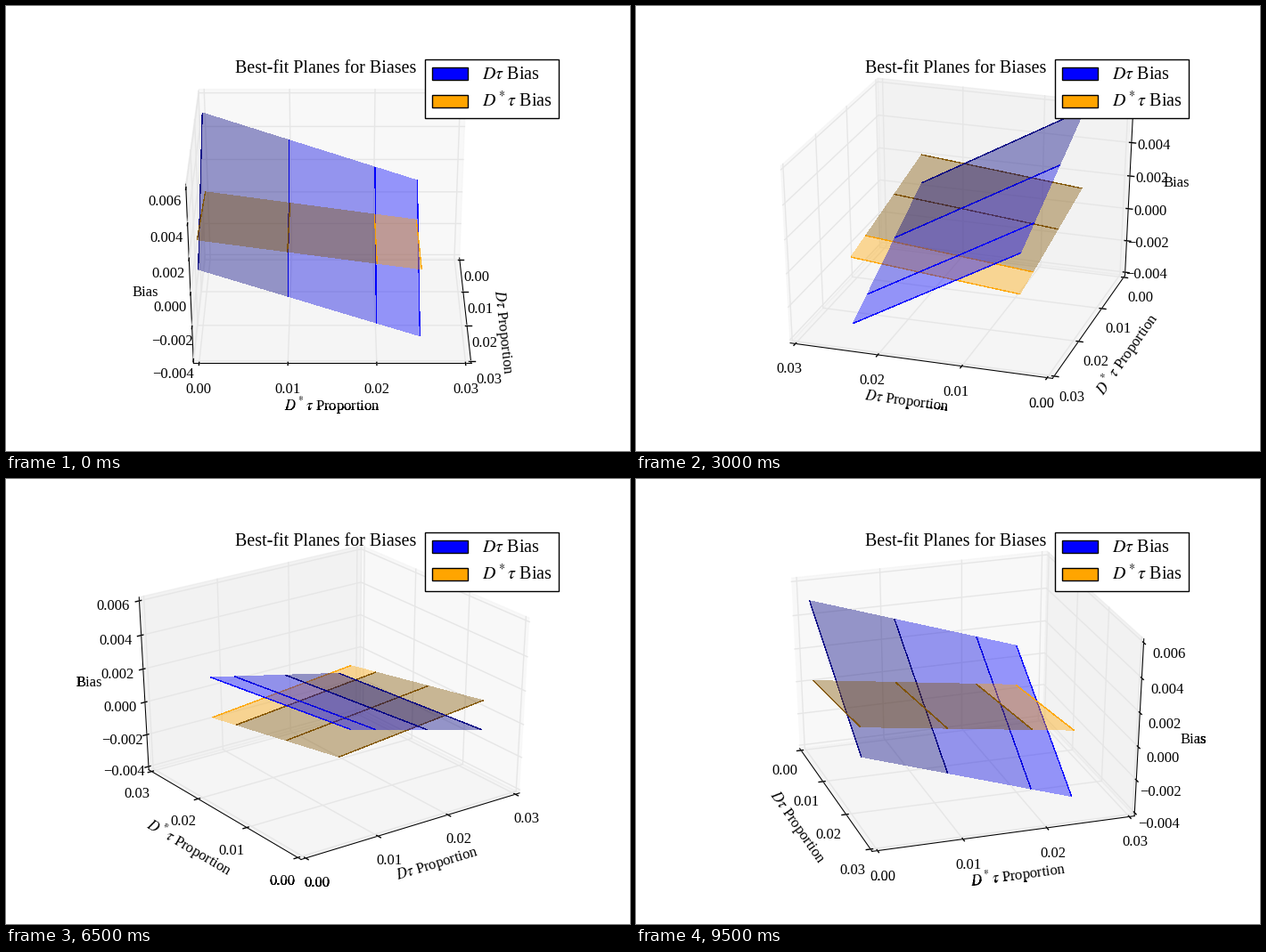
Write a matplotlib script that moves like this. It is 700 px wide and 500 px high and loops after 10000 ms.

```python
import itertools
import math

import matplotlib.pyplot as plt
import numpy as np
from matplotlib.animation import FuncAnimation
from matplotlib.colors import to_rgb
from matplotlib.patches import Polygon, Rectangle
from matplotlib.transforms import Bbox

plt.rcParams["font.family"] = "Liberation Serif"
plt.rcParams["mathtext.fontset"] = "stix"

W, H, FRAMES = 700, 500, 20
LEFT, RIGHT, TOP, BOTTOM = 87.5, 630, 50, 450
ELEV, DIST = math.radians(30), 10
HALF = 0.5 + 1 / 48          # half the box, with a small margin
DELTA = 1 / 12
OFFSET_UNIT = 48 / (72 * (5.425 + 4)) * DELTA
TICK_LABEL_OFFSET = 12 * OFFSET_UNIT
AXIS_LABEL_OFFSET = 26 * OFFSET_UNIT

PROPORTIONS = [0.00, 0.01, 0.02, 0.03]
BIASES = [-0.004, -0.002, 0.000, 0.002, 0.004, 0.006]

# label, tick values, decimals, (low, high), tick direction, pane grey
AXES = [
    (r"$D\tau$ Proportion", PROPORTIONS, 2, (0, 0.03), 1, 0.95),
    (r"$D^*\tau$ Proportion", PROPORTIONS, 2, (0, 0.03), 0, 0.90),
    ("Bias", BIASES, 3, (-0.004, 0.006), 0, 0.925),
]

# colour, plane coefficients (constant, x, y), brightness of each strip
PLANES = [
    ("blue", (-0.041, -0.827, -0.483), (0.5, 0.875, 1)),
    ("orange", (-0.0522, 0.1418, -0.207), (0.5, 0.5, 1)),
]
STRIP_EDGES = [y / 0.03 - 0.5 for y in (0, 0.01, 0.02, 0.025)]
PLANE_X = (-1 / 3, 1 / 3)

fig = plt.figure(figsize=(W / 100, H / 100), dpi=100, facecolor="white")
ax = fig.add_axes([0, 0, 1, 1])

# Strips of the figure outside the plot area, where text has hard edges.
OUTSIDE = [
    Bbox.from_extents(0, 0, LEFT - 0.5, H),
    Bbox.from_extents(RIGHT, 0, W, H),
    Bbox.from_extents(LEFT - 0.5, 0, RIGHT, H - BOTTOM),
]


class Camera:
    def __init__(self, azimuth):
        self.cos, self.sin = math.cos(azimuth), math.sin(azimuth)

    def depth(self, p):
        toward = self.cos * p[0] + self.sin * p[1]
        return DIST - toward * math.cos(ELEV) - p[2] * math.sin(ELEV)

    def project(self, p):
        toward = self.cos * p[0] + self.sin * p[1]
        across = self.cos * p[1] - self.sin * p[0]
        up = p[2] * math.cos(ELEV) - toward * math.sin(ELEV)
        depth = self.depth(p)
        x = LEFT + (RIGHT - LEFT) * (across / depth + 0.095) / 0.185
        y = BOTTOM - (BOTTOM - TOP) * (up / depth + 0.095) / 0.185
        return x, y

    def project_all(self, points):
        return np.array([self.project(p) for p in points])


def changed(point, index, value):
    point = np.array(point, float)
    point[index] = value
    return point


def pushed_out(point, index, amount):
    """Move a point away from the centre along all axes but one."""
    shift = np.where(np.asarray(point) < 0, -amount, amount)
    shift[index] = 0
    return point + shift


def line(points, order, **style):
    style = {"color": "black", "lw": 1, **style}
    ax.plot(points[:, 0], points[:, 1], zorder=next(order), **style)


def label(x, y, text, order, **style):
    style = {"size": 12, "ha": "center", "va": "center", **style}
    ax.text(x, y, text, zorder=next(order), **style)
    if x < 140 or x > 600 or y > 400:
        for box, _ in itertools.product(OUTSIDE, range(3)):
            ax.text(x, y, text, zorder=next(order), clip_on=True,
                    **style).set_clip_box(box)


def draw_pane(cam, index, far, grey, order):
    a, b = [i for i in range(3) if i != index]
    corners = []
    for u, v in ((-1, -1), (1, -1), (1, 1), (-1, 1)):
        p = far.copy()
        p[a], p[b] = u * HALF, v * HALF
        corners.append(p)
    ax.add_patch(Polygon(cam.project_all(corners), closed=False, lw=1,
                         color=(grey,) * 3, alpha=0.5, zorder=next(order)))


def draw_axis(cam, index, far, order):
    name, values, decimals, (low, high), tick_dir, _ = AXES[index]
    start = changed(far, tick_dir, -far[tick_dir])
    end = changed(start, index, -start[index])
    edge = cam.project_all([start, end])
    line(edge, order, lw=0.75)

    x, y = cam.project(pushed_out((start + end) / 2, index, AXIS_LABEL_OFFSET))
    angle = 0
    if len(name) > 4:
        dx, dy = edge[1] - edge[0]
        angle = math.degrees(math.atan2(-dy, dx)) % 180
        angle -= 180 if angle > 90 else 0
    label(x, y, name, order, rotation=angle, rotation_mode="anchor")

    places = [(v - low) / (high - low) - 0.5 for v in values]
    b, c = (index + 1) % 3, (index + 2) % 3
    for place in places:
        meet = changed(far, index, place)
        grid = [changed(meet, b, -far[b]), meet, changed(meet, c, -far[c])]
        line(cam.project_all(grid), order, color="0.9")

    sign = np.sign(far[tick_dir])
    for value, place in zip(values, places):
        p = changed(start, index, place)
        ends = [changed(p, tick_dir, p[tick_dir] + f * sign * DELTA)
                for f in (0.1, -0.2)]
        line(cam.project_all(ends), order)
        x, y = cam.project(pushed_out(p, index, TICK_LABEL_OFFSET))
        text = f"{value:.{decimals}f}".replace("-", "\u2212")
        label(x, y, text, order, va="top")


def on_plane(coefs, x, y):
    return np.array([x, y, coefs[0] + coefs[1] * x + coefs[2] * y])


def nearest(cam, plane):
    corners = itertools.product(PLANE_X, (STRIP_EDGES[0], STRIP_EDGES[-1]))
    return min(cam.depth(on_plane(plane[1], x, y)) for x, y in corners)


def draw_plane(cam, plane, order):
    name, coefs, shades = plane
    strips = list(zip(STRIP_EDGES, STRIP_EDGES[1:], shades))
    if cam.sin < 0:
        strips.reverse()
    for y0, y1, shade in strips:
        color = tuple(shade * c for c in to_rgb(name))
        sides = [cam.project_all([on_plane(coefs, x, y) for x in PLANE_X])
                 for y in (y0, y1)]
        ax.add_patch(Polygon(np.vstack([sides[0], sides[1][::-1]]), lw=0,
                             facecolor=color, alpha=0.4, antialiased=False,
                             zorder=next(order)))
        for side in sides:
            line(side, order, color=color, alpha=0.9, lw=0.2,
                 antialiased=False, solid_capstyle="butt")


def draw_legend(order):
    ax.add_patch(Rectangle((470, 60), 150, 66, fc="white", ec="black", lw=1,
                           zorder=next(order)))
    rows = [("blue", r"$D\tau$ Bias", 68.5, 82.5),
            ("orange", r"$D^*\tau$ Bias", 100, 113.5)]
    for color, text, top, baseline in rows:
        ax.add_patch(Rectangle((478, top), 40, 14, fc=color, ec="black", lw=1,
                               zorder=next(order)))
        ax.text(534, baseline, text, size=14.4, va="baseline",
                zorder=next(order))


def draw(frame):
    ax.cla()
    ax.set_xlim(0, W)
    ax.set_ylim(H, 0)
    ax.axis("off")
    order = itertools.count(1)
    cam = Camera(math.radians(360 * frame / FRAMES))
    far = np.array([HALF if cam.cos < 0 else -HALF,
                    HALF if cam.sin < 0 else -HALF, -HALF])

    for index in range(3):
        draw_pane(cam, index, far, AXES[index][-1], order)
    for index in range(3):
        draw_axis(cam, index, far, order)
    for plane in sorted(PLANES, key=lambda p: -nearest(cam, p)):
        draw_plane(cam, plane, order)

    ax.text((LEFT + RIGHT) / 2, 75, "Best-fit Planes for Biases", size=14.4,
            ha="center", va="baseline", zorder=next(order))
    draw_legend(order)
    return []


anim = FuncAnimation(fig, draw, frames=FRAMES, interval=500,
                     init_func=lambda: [], repeat=True, repeat_delay=0)
plt.show()
```
